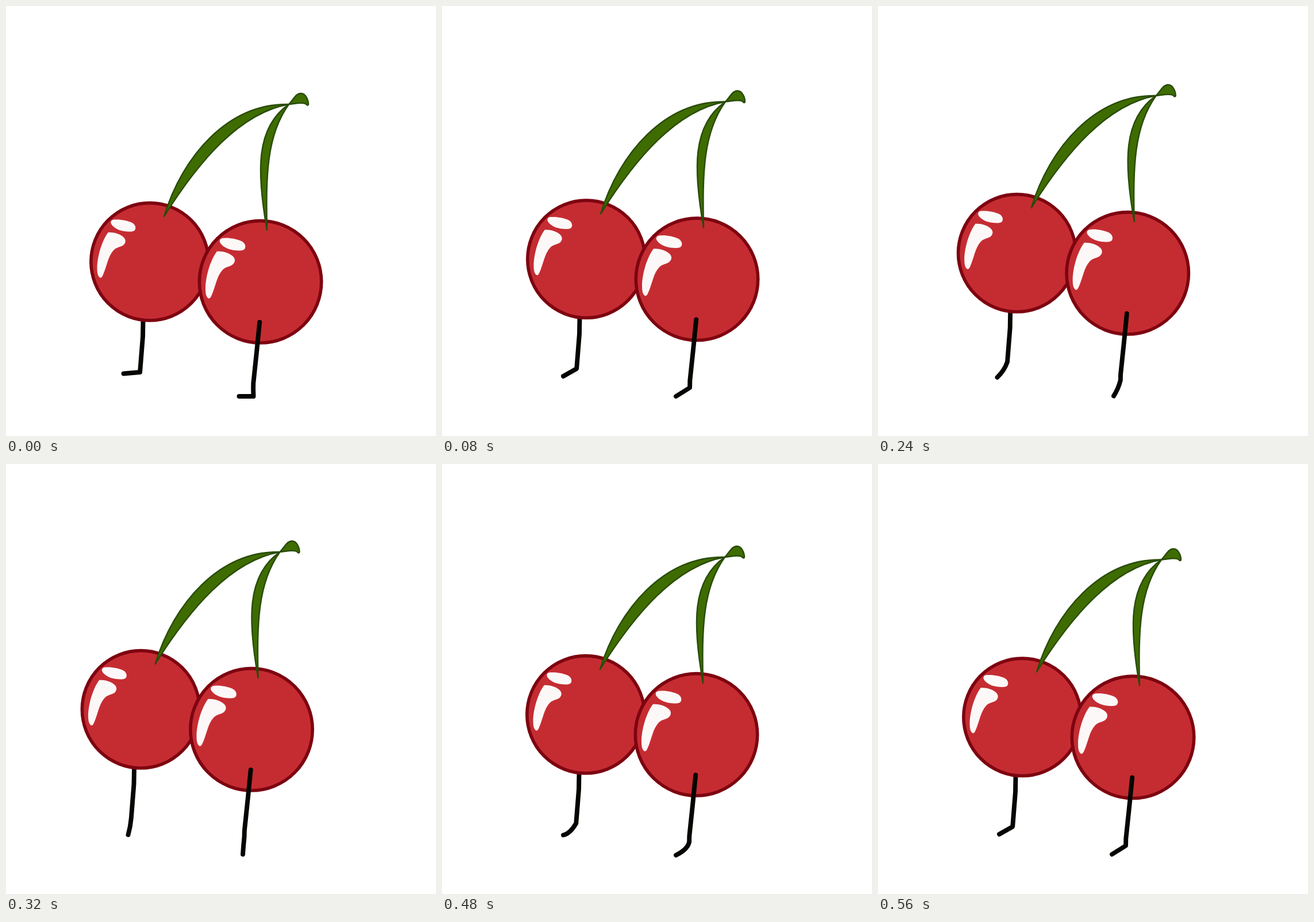
Recreate the animation shown at these times as an HTML page with a canvas. Size 748 by 748 pixels, loop 640 ms.

```html
<!DOCTYPE html>
<html lang="en">
<head>
<meta charset="utf-8">
<title>Walking cherries</title>
<style>
  html, body { margin: 0; width: 100%; height: 100%; overflow: hidden; background: #fff; }
  canvas { display: block; width: 748px; height: 748px; }
</style>
</head>
<body>
<canvas id="stage" width="748" height="748"></canvas>
<script>
const ctx = document.getElementById('stage').getContext('2d');
const STEP = 80;

// Body offset, then each foot as [bend x, bend y, toe x, toe y] on the stage.
const poses = {
  flat:   { dx: 0,     dy: 0,    left: [233, 637, 204.5, 639.5], right: [430.5, 679, 405.5, 679] },
  tilt:   { dx: 1,     dy: -4.5, left: [234, 631, 211, 644],     right: [431, 664, 407, 679] },
  bend:   { dx: 0,     dy: -9,   left: [223, 643, 211, 645.5],   right: [428, 670, 407, 680.5], curved: true },
  point:  { dx: -8.3,  dy: -15,  left: [220, 634, 207.5, 646],   right: [418, 666, 410, 678.5], curved: true },
  tiptoe: { dx: -15.5, dy: -18,  left: [216.5, 631, 212.5, 645], right: [413, 664, 412, 679],   curved: true }
};
const cycle = ['flat', 'tilt', 'bend', 'point', 'tiptoe', 'point', 'bend', 'tilt'];

const stems = [
  'M275 366C307 261 386 169 492 171C407 186 336 269 275 366Z',
  'M454 390C436 288 434 211 492 171C453 225 452 296 454 390Z',
  'M492 171C500 163 504 152 513 152C521 152 526 163 526 171C525 174 523 172 521 170C513 167 504 170 492 171Z'
].map(d => new Path2D(d));

// Highlights relative to the centre of a cherry.
const shine = new Path2D(
  'M-64 -76C-54 -77 -41 -74 -34 -71C-27 -68 -25 -61 -28 -57C-31 -53 -44 -54 -52 -56' +
  'C-61 -58 -69 -64 -71 -69C-72 -74 -69 -76 -64 -76Z' +
  'M-76 -53C-64 -54 -52 -49 -47 -43C-43 -38 -45 -31 -52 -28C-57 -26 -62 -25 -66 -21' +
  'C-77 -9 -78 8 -86 25C-88 29 -90 30 -92 28C-95 25 -96 20 -96 12C-96 -8 -88 -37 -76 -53Z');

function cherry(x, y, scale, shift) {
  ctx.beginPath();
  ctx.arc(x, y, 109 * scale - 2.8, 0, Math.PI * 2);
  ctx.fillStyle = '#c52c32';
  ctx.fill();
  ctx.lineWidth = 5.6;
  ctx.strokeStyle = '#7d0410';
  ctx.stroke();
  ctx.save();
  ctx.translate(x + shift, y);
  ctx.scale(scale, scale);
  ctx.fillStyle = '#fdf8f8';
  ctx.fill(shine);
  ctx.restore();
}

function leg(pose, joints, foot) {
  const [bx, by, tx, ty] = foot;
  ctx.beginPath();
  for (const [x, y] of joints) ctx.lineTo(x + pose.dx, y + pose.dy);
  if (pose.curved) {
    ctx.quadraticCurveTo(bx, by, tx, ty);
  } else {
    ctx.lineTo(bx, by);
    ctx.lineTo(tx, ty);
  }
  ctx.lineWidth = 7.9;
  ctx.strokeStyle = '#050502';
  ctx.stroke();
}

function draw(pose) {
  ctx.fillStyle = '#fff';
  ctx.fillRect(0, 0, 748, 748);
  ctx.lineCap = ctx.lineJoin = 'round';
  leg(pose, [[238.5, 546], [238, 575], [233.3, 634]], pose.left);

  ctx.save();
  ctx.translate(pose.dx, pose.dy);
  cherry(250, 444.8, 0.963, 1);
  cherry(442.5, 479.8, 1, 0.5);
  ctx.fillStyle = '#3e6c00';
  ctx.strokeStyle = '#284b08';
  ctx.lineWidth = 2.4;
  for (const stem of stems) {
    ctx.fill(stem);
    ctx.stroke(stem);
  }
  ctx.restore();

  leg(pose, [[441.2, 550], [436, 602], [430.3, 656], [430.1, 666]], pose.right);
}

function tick() {
  const i = Math.floor(performance.now() / STEP) % cycle.length;
  draw(poses[cycle[i]]);
  requestAnimationFrame(tick);
}
tick();
</script>
</body>
</html>
```
